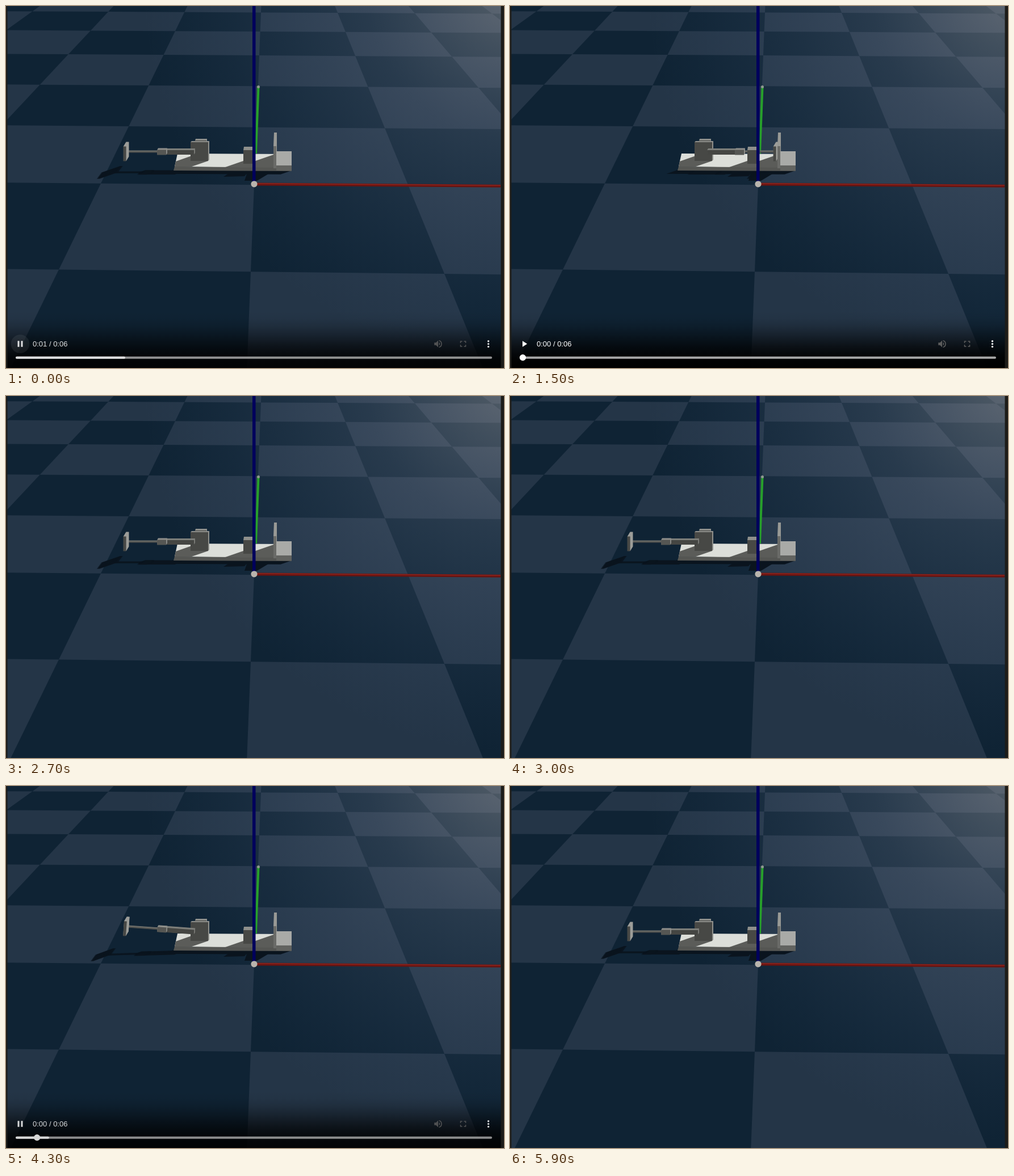
These frames come from a looping animation (877x638 px, 6.8 s). An HTML page with a canvas:

```html
<!DOCTYPE html>
<html>
<head>
<meta charset="utf-8">
<style>
  html, body { margin: 0; width: 100%; height: 100%; overflow: hidden; background: #1d1c19; }
  canvas { position: absolute; left: 0; top: 0; }
</style>
</head>
<body>
<canvas id="scene" width="877" height="638"></canvas>
<canvas id="ui" width="877" height="638"></canvas>
<script>
const ui = document.getElementById('ui');
const sceneCtx = document.getElementById('scene').getContext('2d');
const uiCtx = ui.getContext('2d');
let g = sceneCtx;

const LOOP = 6800, DURATION = 6.55, FADE = 300, REWIND = 350;
// Each run plays from a moment until the knob is grabbed and pulled back to zero
const RUNS = [{ from: -1610, grab: 1100 }, { from: 1600, grab: 3350 }, { from: 3840, grab: LOOP }];
const LIGHT = { x: -1.3, y: .45 };
const INK = '#0a141e', SHADE = '#5b5c59', FRONT = '#474845', LIT = '#8f908c';

const clamp = v => Math.max(0, Math.min(1, v));

function poly(color, ...p) {
  g.fillStyle = color;
  g.beginPath();
  for (let i = 0; i < p.length; i += 2) g.lineTo(p[i], p[i + 1]);
  g.closePath();
  g.fill();
}

function rect(color, x, y, w, h) {
  g.fillStyle = color;
  g.fillRect(x, y, w, h);
}

function dot(color, x, y, r) {
  g.fillStyle = color;
  g.beginPath();
  g.arc(x, y, r, 0, 7);
  g.fill();
}

function line(color, w, x0, y0, x1, y1) {
  g.strokeStyle = color;
  g.lineWidth = w;
  g.beginPath();
  g.moveTo(x0, y0);
  g.lineTo(x1, y1);
  g.stroke();
}

// Block with a front face and a receding lit top and side
function box(x, y, w, h, dx, dy, front = FRONT, side = LIT) {
  poly(side, x, y, x + dx, y + dy, x + w + dx, y + dy, x + w + dx, y + h + dy, x + w, y + h);
  rect(front, x, y, w, h);
}

// Shadow that an edge throws along the light
function cast(color, x0, y0, x1, y1, h) {
  const dx = LIGHT.x * h, dy = LIGHT.y * h;
  poly(color, x0, y0, x1, y1, x1 + dx, y1 + dy, x0 + dx, y0 + dy);
}

// Floor grid corner to screen
function project(i, j) {
  const w = 1 - .0037 * i + .2018 * j;
  return [(437 + 269.4 * i + 93 * j) / w, (315.3 + 1.3 * i - 58.48 * j) / w];
}

function floor() {
  rect('#0f2334', 0, 0, 877, 638);
  for (let j = -2; j < 7; j++)
    for (let i = -6; i < 6; i++)
      if ((i + j) % 2 === 0)
        poly('#243547', ...project(i, j), ...project(i + 1, j), ...project(i + 1, j + 1), ...project(i, j + 1));
  const glow = g.createRadialGradient(900, -30, 0, 900, -30, 660);
  glow.addColorStop(0, 'rgba(170,168,168,.46)');
  glow.addColorStop(.4, 'rgba(130,142,165,.22)');
  glow.addColorStop(1, 'rgba(80,110,150,0)');
  rect(glow, 0, 0, 877, 638);
}

// Arm parts lie along +x from the pivot; each is stacked along the depth direction
function arm(angle, shadow) {
  const [dx, dy] = shadow ? [-2.9, 3] : [.6, -1];
  const part = (x, w, h, depth, front, side) => {
    for (let z = depth; z >= -depth; z -= .5) {
      g.save();
      g.translate(340 + dx * z, 256.5 + dy * z);
      g.rotate(-angle * Math.PI / 180);
      rect(shadow || (z - .5 < -depth ? front : side), x, -h / 2, w, h);
      g.restore();
    }
  };
  part(70, 56, 2, 1, '#50514e', '#6d6e6a');
  part(8, 54, 8, 1.5, '#454643', '#7d7e7a');
  part(57, 16, 9, 1.5, '#555653', LIT);
  part(126, 5, 26, 4, FRONT, '#9d9e9a');
}

function machine(angle) {
  cast(INK, 295, 289, 503, 290, 15);
  poly(INK, 392, 295, 424, 295, 420, 300, 383, 301);
  poly(INK, 424, 296, 462, 296, 442, 308, 420, 308);
  g.save();
  g.transform(1, 0, -LIGHT.x, -LIGHT.y, -362.1, 408.65);
  arm(angle, INK);
  g.restore();

  line('#27a02b', 4, 444.5, 143, 440, 260);
  dot('#8d9a8d', 444.5, 142.5, 2.5);

  // base plate and the shadows on it
  poly('#dcded9', 302, 260, 503, 261, 503, 286, 297, 283);
  g.save();
  g.clip();
  cast(SHADE, 327, 264, 356, 273, 40);
  cast(SHADE, 418, 273, 437, 279, 40);
  cast(SHADE, 471, 262, 477, 288, 40);
  g.restore();
  poly('#555653', 297, 283, 503, 285, 503, 291, 295, 290);

  box(333, 237, 20, 4, 1, -3);
  box(325, 240, 31, 33, 2, -2);
  arm(angle);
  box(418, 254, 19, 24, 1, -6);
  box(471, 247, 5, 39, 1, -24, '#6a6b68', '#989995');
  box(476, 281, 27, 9, 0, -25, '#626360', '#a9aaa7');
}

function axes() {
  line('#6a1310', 5, 440, 314, 871, 317.2);
  line('#8c261f', 1.5, 440, 313, 871, 316.2);
  rect('#00005c', 434, 0, 5.5, 311);
  dot('#b9b5ad', 437, 313.8, 5.6);
}

const ICONS = {
  pause: new Path2D('M6 19h4V5H6zM14 5v14h4V5z'),
  play: new Path2D('M8 5v14l11-7z'),
  volume: new Path2D('M3 9v6h4l5 5V4L7 9zM16.5 12a4.5 4.5 0 0 0-2.5-4v8a4.5 4.5 0 0 0 2.5-4zM14 3.2v2.1a7 7 0 0 1 0 13.4v2.1a9 9 0 0 0 0-17.6z'),
  full: new Path2D('M7 14H5v5h5v-2H7zM5 10h2V7h3V5H5zM17 17h-3v2h5v-5h-2zM14 5v2h3v3h2V5z')
};

function icon(name, x, color) {
  g.save();
  g.translate(x - 9, 586.6);
  g.scale(.75, .75);
  g.fillStyle = color;
  g.fill(ICONS[name]);
  g.restore();
}

function bar(color, w) {
  g.fillStyle = color;
  g.beginPath();
  g.roundRect(17, 617.7, w, 4, 2);
  g.fill();
}

function scrim(alpha) {
  const fade = g.createLinearGradient(0, 538, 0, 638);
  for (let i = 0; i <= 8; i++) fade.addColorStop(i / 8, `rgba(0,0,0,${1 - Math.cos(i / 8 * Math.PI)})`.replace(/[\d.e-]+\)$/, m => parseFloat(m) / 2 + ')'));
  g.globalAlpha = Math.sqrt(alpha);
  rect(fade, 0, 538, 877, 100);
  g.globalAlpha = 1;
}

function controls(t, video, paused) {
  g.clearRect(0, 0, 877, 638);
  if (t <= RUNS[0].grab) dot('rgba(255,255,255,.08)', 25, 595.6, 16.3);
  icon(paused ? 'play' : 'pause', 25, '#fff');
  icon('volume', 761, '#5c5c5c');
  icon('full', 805, '#5c5c5c');
  for (const y of [-4.8, 0, 4.8]) dot('#fff', 849.5, 595.6 + y, 1.7);

  // Without the pointer on the bar it refreshes only about twice a second
  const hover = t >= 700 && t < 2200 || t >= 3400;
  const shown = hover ? video : 1.507 + .52 * Math.floor((video - 1.507) / .5);
  g.fillStyle = '#fff';
  g.font = '13px "Liberation Sans", Arial, sans-serif';
  g.fillText(`0:0${Math.floor(shown)} / 0:06`, 47, 600);

  const px = v => v / DURATION * 839;
  bar('#a6a6a6', 839);
  if (shown > 0) bar('#fff', px(shown));
  if (hover) {
    const tick = .04 + .25 * Math.floor((video - .04) / .25 + 1e-6);
    dot('#fff', Math.max(22.5, 17.5 + px(tick)), 619.6, 5.6);
  }
}

function draw(now) {
  const t = Math.floor(now % LOOP / 100) * 100;
  const run = RUNS.findLast(r => t >= r.from);
  const paused = t > run.grab || t === run.from;
  const video = (Math.min(t, run.grab) - run.from) / 1000 * clamp(1 - (t - run.grab) / REWIND);
  const angle = 180 * (1 - Math.exp(-Math.pow(video / .221, 1.816)));
  const visible = (from, to) => clamp(Math.min(t - from, to + FADE - t) / FADE);
  const alpha = visible(-260, 1750) + visible(3100, 4250);

  g = sceneCtx;
  floor();
  machine(angle);
  axes();
  scrim(alpha);
  rect('#1d1c19', 0, 0, 2.5, 638);
  rect('#1d1c19', 871.5, 0, 5.5, 638);

  g = uiCtx;
  ui.style.opacity = alpha;
  controls(t, video, paused);
}

let start;
function tick(now) {
  start ??= now;
  draw(now - start);
  requestAnimationFrame(tick);
}
requestAnimationFrame(tick);
</script>
</body>
</html>
```
